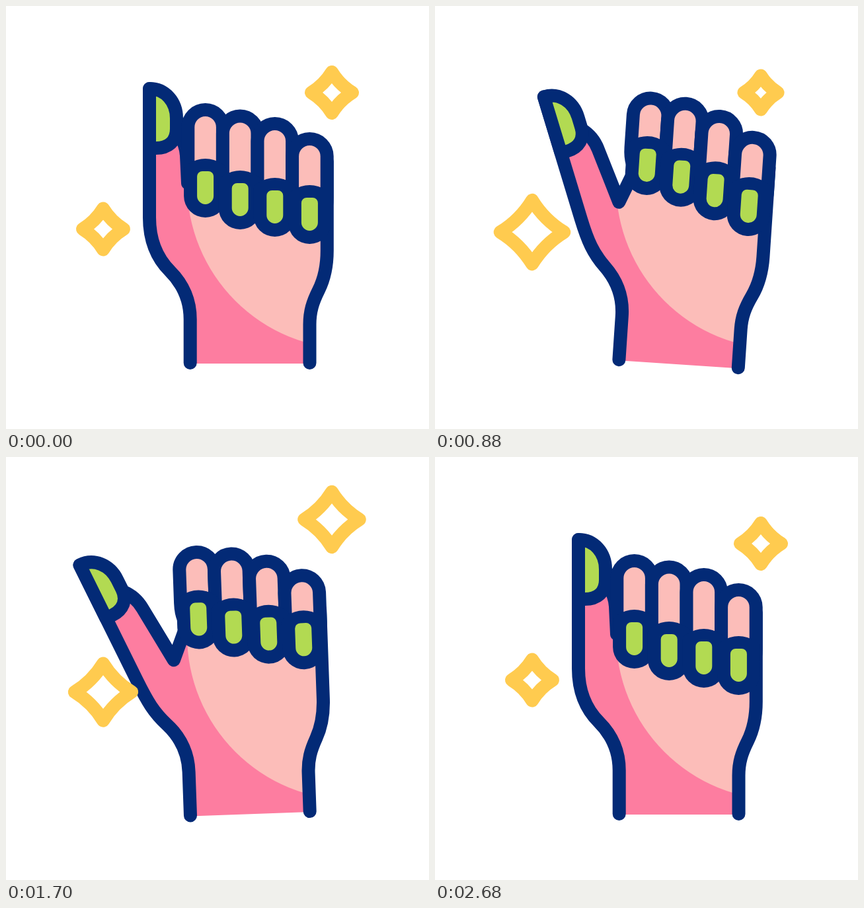
These frames come from a looping animation (640x640 px, 3 s). An HTML page:

```html
<!DOCTYPE html>
<html lang="en">
<head>
<meta charset="utf-8">
<title>Waving hand</title>
<style>
  html, body { margin: 0; width: 100%; height: 100%; overflow: hidden; background: #fff; }
  svg { display: block; width: 100vw; height: 100vh; }
  .line { fill: none; stroke: #032a76; stroke-width: 20; stroke-linecap: round; stroke-linejoin: round; }
  .navy { fill: #032a76; }
  .skin { fill: #fcbdb9; }
  .shade { fill: #fd7da0; }
  .nail { fill: #b2da52; }
  .spark { fill: none; stroke: #ffcb4f; stroke-width: 20; stroke-linecap: round; stroke-linejoin: round; }
</style>
</head>
<body>
<svg id="stage" viewBox="0 0 640 640">
  <clipPath id="palm"><path id="palmShape"/></clipPath>
  <g clip-path="url(#palm)">
    <rect class="shade" width="640" height="640"/>
    <circle class="skin" cx="523" cy="270" r="249"/>
  </g>
  <g id="hand">
    <path class="line" id="outer"/>
    <path class="line" id="inner"/>
    <path class="line" d="M485.8 235V370C485.8 390 482 412 473 430C464 448 459.5 462 459.5 482V540"/>
    <path class="line nail" id="thumb"
      d="M217 125C241 125 258 145 258 170V186C258 204 246 215 227 215H217Z"/>
  </g>
</svg>
<script>
const LOOP = 3000;
const PIVOT = [350, 533];
const THUMB = { x: 241, y: 354, angle: -24.3 * Math.PI / 180 };
const byId = id => document.getElementById(id);
const stage = byId('stage'), hand = byId('hand');

function add(parent, cls, d = '') {
  const el = document.createElementNS('http://www.w3.org/2000/svg', 'path');
  el.setAttribute('class', cls);
  el.setAttribute('d', d);
  parent.append(el);
  return el;
}

// Eased 0 to 1 between two times.
function ramp(t, from, to) {
  const x = Math.min(1, Math.max(0, (t - from) / (to - from)));
  return 0.5 - 0.5 * Math.cos(Math.PI * x);
}

const tilt = t => 4.8 * ramp(t, 210, 760) - 12.6 * ramp(t, 760, 1440)
  + 11.8 * ramp(t, 1450, 1960) - 4 * ramp(t, 1960, 2690);

const thumbOpen = t =>
  (0.85 * ramp(t, 210, 710) + 0.15 * ramp(t, 1000, 1400)) * (1 - ramp(t, 1700, 2200));

// Each star drifts by dy and back; its size goes rest, calm, peak, calm, rest.
const stars = [
  { x: 493, y: 131, dy: -50.5, rest: 31, calm: 25.5, peak: 48, out: [930, 1470], back: [1500, 2070] },
  { x: 147, y: 337.5, dy: 47.5, rest: 31, calm: 50, peak: 32, out: [760, 1360], back: [1430, 1900] }
];
for (const s of stars) s.el = add(stage, 'spark');

const TIP = 'M-32.5 0C-32.5 -6 -30 -9 -26 -11Q0 -27 26 -11C30 -9 32.5 -6 32.5 0V37.5a32.5 32.5 0 0 1 -65 0Z';
const NAIL = 'M-12.5 8a8 8 0 0 1 8 -8h9a8 8 0 0 1 8 8V37.5a12.5 12.5 0 0 1 -25 0Z';

const fingers = [
  { top: 167, nail: 250, topLift: 15, nailLift: 31.5 },
  { top: 176.5, nail: 268, topLift: 20, nailLift: 35.5 },
  { top: 188, nail: 279, topLift: 18.5, nailLift: 34.5 },
  { top: 211, nail: 290, topLift: 18, nailLift: 35 }
];
fingers.forEach((f, i) => {
  f.x = 301.6 + 52.6 * i;
  f.body = add(hand, 'line');
  f.body.style.fill = '#fcbdb9';
});
for (const f of fingers) f.parts = [add(hand, 'navy', TIP), add(hand, 'nail', NAIL)];

const rays = [-1, 0, 1].map(side => ({
  x: 302.4 + 39 * side, y: side ? 121 : 112,
  angle: side * 0.49, el: add(hand, 'spark')
}));

function drawHand(t) {
  const open = thumbOpen(t);
  // Straight blend between the closed and the open thumb.
  const c = 1 - open + open * Math.cos(THUMB.angle);
  const s = open * Math.sin(THUMB.angle);
  const onThumb = (x, y) => {
    const dx = x - THUMB.x, dy = y - THUMB.y;
    return `${THUMB.x + c * dx - s * dy} ${THUMB.y + s * dx + c * dy} `;
  };

  const dip = ramp(open, 0, 1);
  const web = `${275 - 13 * dip} ${268 + 36 * dip}`;
  const side = `M${onThumb(217, 125)}L${onThumb(217, 320)}C${onThumb(217, 356)}229 382 248 401`
    + 'C268 421 278.7 446 278.7 474V540';
  const crease = `M279 262L${web}L${onThumb(273, 226)}`
    + `C${onThumb(272, 212)}${onThumb(267, 200)}${onThumb(258, 190)}`;
  const turn = `rotate(${tilt(t)} ${PIVOT})`;

  byId('outer').setAttribute('d', side);
  byId('inner').setAttribute('d', crease);
  byId('palmShape').setAttribute('d', side
    + 'V541H459.5V482C459.5 462 464 448 473 430C482 412 485.8 390 485.8 370V300'
    + crease.replace('M', 'L') + 'Z');
  byId('palmShape').setAttribute('transform', turn);
  byId('thumb').setAttribute('transform',
    `translate(${THUMB.x} ${THUMB.y}) matrix(${c} ${s} ${-s} ${c} 0 0) translate(${-THUMB.x} ${-THUMB.y})`);
  hand.setAttribute('transform', turn);
}

function drawFingers(t) {
  fingers.forEach((f, i) => {
    const start = 310 + 100 * i, back = 2100 - 100 * i;
    const lift = ramp(t, start, start + 500) - ramp(t, back, back + 500);
    const top = f.top - f.topLift * lift + 16.3;
    const nail = f.nail - f.nailLift * lift;
    f.body.setAttribute('d', `M${f.x - 22.5} ${nail + 24}Q${f.x - 26.3} ${nail + 14} ${f.x - 26.3} ${nail}`
      + `V${top}a26.3 26.3 0 0 1 52.6 0V${nail}q0 14 -3.8 24`);
    for (const p of f.parts) p.setAttribute('transform', `translate(${f.x} ${nail})`);
  });
}

function drawRays(t) {
  const shown = t >= 1120 && t < 1660;
  const head = 28 * ramp(t, 1120, 1580) + 0.1;
  const tail = 28 * ramp(t, 1340, 1660);
  for (const r of rays) {
    const at = d => `${r.x + Math.sin(r.angle) * d} ${r.y - Math.cos(r.angle) * d}`;
    r.el.setAttribute('d', shown ? `M${at(tail)}L${at(head)}` : '');
  }
}

function drawStars(t) {
  for (const s of stars) {
    const away = ramp(t, ...s.out) - ramp(t, ...s.back);
    const active = ramp(t, 210, s.out[0]) - ramp(t, s.back[1], 2660);
    const r = s.rest + (s.calm - s.rest) * active + (s.peak - s.calm) * away;
    const k = r * 0.38;
    s.el.setAttribute('d',
      `M0 ${-r}Q${k} ${-k} ${r} 0Q${k} ${k} 0 ${r}Q${-k} ${k} ${-r} 0Q${-k} ${-k} 0 ${-r}Z`);
    s.el.setAttribute('transform', `translate(${s.x} ${s.y + s.dy * away})`);
  }
}

const begin = performance.now();
function tick() {
  const t = (performance.now() - begin) % LOOP;
  drawHand(t);
  drawFingers(t);
  drawRays(t);
  drawStars(t);
  requestAnimationFrame(tick);
}
tick();
</script>
</body>
</html>
```
